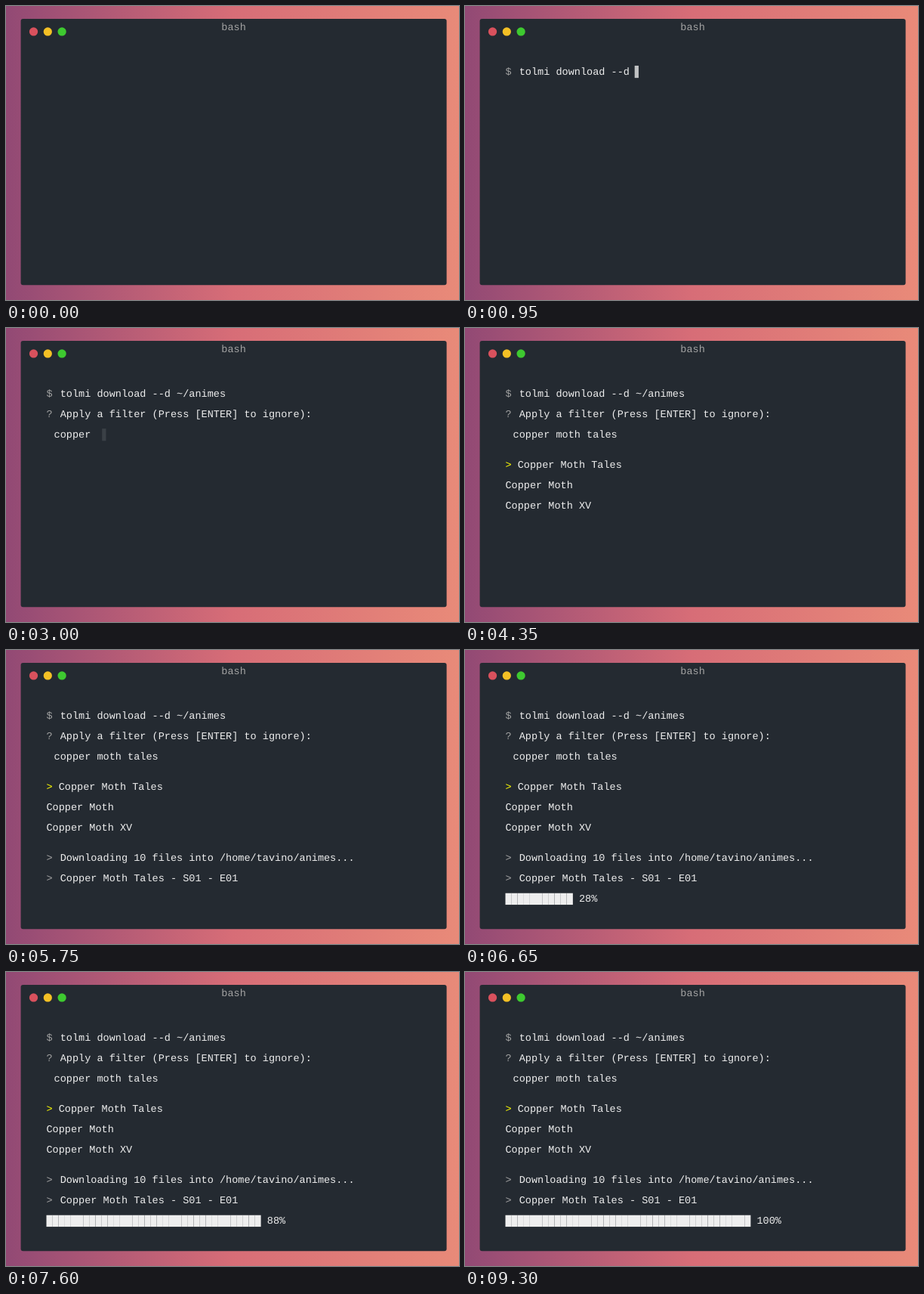
Recreate the animation shown at these times as an HTML page with a canvas. Size 600 px wide and 389 px high, loop 9.35 s.

```html
<!DOCTYPE html>
<html lang="en">
<head>
<meta charset="utf-8">
<title>Terminal</title>
<style>
  html, body { margin: 0; width: 100%; height: 100%; overflow: hidden; }
  canvas { display: block; }
</style>
</head>
<body>
<canvas id="stage" width="600" height="389"></canvas>
<script>
const ctx = document.getElementById('stage').getContext('2d');

const LOOP = 9350;
const CHAR_DELAY = 40;
const BAR_LENGTH = 40;
const SCALE = 0.752;
const EM = 18;
const LINE = 2 * EM;
const GROUP_GAP = 17.3;
const LEFT = 45;
const FIRST_BASELINE = 97.8;
const TEXT = '#eee';
const SUBTLE = '#a2a2a2';

// Each entry appears at `at`; rows count from the top, groups add extra space.
const lines = [
  { at: 215, end: 1995, row: 0, group: 0, prompt: '$', text: 'tolmi download --d ~/animes', typed: true },
  { at: 1995, row: 1, group: 0, prompt: '?', text: 'Apply a filter (Press [ENTER] to ignore):' },
  { at: 2695, end: 4075, row: 2, group: 0, prompt: '', text: 'copper moth tales', typed: true },
  { at: 4075, row: 3, group: 1, marker: '> ', text: 'Copper Moth Tales' },
  { at: 4075, row: 4, group: 1, text: 'Copper Moth' },
  { at: 4075, row: 5, group: 1, text: 'Copper Moth XV' },
  { at: 4775, row: 6, group: 2, prompt: '>', text: 'Downloading 10 files into /home/tavino/animes...' },
  { at: 5475, row: 7, group: 2, prompt: '>', text: 'Copper Moth Tales - S01 - E01' },
  { at: 6175, row: 8, group: 2, progress: true }
];

// CSS "ease": cubic-bezier(.25, .1, .25, 1)
function ease(x) {
  const bezier = (a, b, s) => 3 * a * s * (1 - s) ** 2 + 3 * b * s * s * (1 - s) + s ** 3;
  let low = 0, high = 1;
  for (let i = 0; i < 24; i++) {
    const mid = (low + high) / 2;
    if (bezier(0.25, 0.25, mid) < x) low = mid; else high = mid;
  }
  return bezier(0.1, 1, low);
}

function blink(age) {
  const phase = (age % 1000) / 500;
  return phase < 1 ? 1 - ease(phase) : ease(phase - 1);
}

// Draws text and returns the x where it ends.
function write(text, x, y, color) {
  ctx.fillStyle = color;
  ctx.fillText(text, x, y);
  return x + ctx.measureText(text).width;
}

function drawBackground() {
  const gradient = ctx.createLinearGradient(-380, 0, 980, 0);
  gradient.addColorStop(0, '#3a1c71');
  gradient.addColorStop(0.5, '#d76d77');
  gradient.addColorStop(1, '#ffaf7b');
  ctx.fillStyle = gradient;
  ctx.fillRect(0, 0, 600, 389);
}

function drawWindow() {
  ctx.fillStyle = '#242a31';
  ctx.beginPath();
  ctx.roundRect(0, 0, 750, 468.5, 4);
  ctx.fill();
  ['#d9515d', '#f4c025', '#3ec930'].forEach((color, i) => {
    ctx.fillStyle = color;
    ctx.beginPath();
    ctx.arc(22.5 + 25 * i, 22.5, 7.5, 0, 2 * Math.PI);
    ctx.fill();
  });
  ctx.textAlign = 'center';
  ctx.fillStyle = SUBTLE;
  ctx.fillText('bash', 375, 20.4);
  ctx.textAlign = 'left';
}

function progressText(age) {
  const count = Math.min(BAR_LENGTH, Math.floor(age / CHAR_DELAY));
  return count ? '█'.repeat(count) + ` ${Math.round(count / BAR_LENGTH * 100)}%` : '';
}

function drawLine(line, time) {
  const age = time - line.at;
  if (age < 0) return;
  const active = line.typed && time < line.end;
  // The tall cursor pushes its line down by one pixel.
  const y = FIRST_BASELINE + line.row * LINE + line.group * GROUP_GAP + (active ? 1 : 0);
  let x = LEFT;
  if (line.prompt !== undefined) x = write(line.prompt, x, y, SUBTLE) + 0.75 * EM;
  if (line.marker) x = write(line.marker, x, y, '#ff0');

  let text = line.progress ? progressText(age) : line.text;
  if (line.typed) text = text.slice(0, Math.floor(age / CHAR_DELAY));
  x = write(text, x, y, TEXT);

  if (active) {
    ctx.globalAlpha = blink(age);
    ctx.fillRect(x + 0.5 * EM, y - 16.4, 7, 21.5);
    ctx.globalAlpha = 1;
  }
}

function render(time) {
  ctx.setTransform(1, 0, 0, 1, 0, 0);
  drawBackground();
  ctx.setTransform(SCALE, 0, 0, SCALE, 19.6, 17);
  ctx.font = `${EM}px "Liberation Mono", monospace`;
  ctx.textRendering = 'geometricPrecision';
  ctx.textBaseline = 'alphabetic';
  drawWindow();
  lines.forEach(line => drawLine(line, time));
}

const start = performance.now();
function tick() {
  render((performance.now() - start) % LOOP);
  requestAnimationFrame(tick);
}
tick();
</script>
</body>
</html>
```
